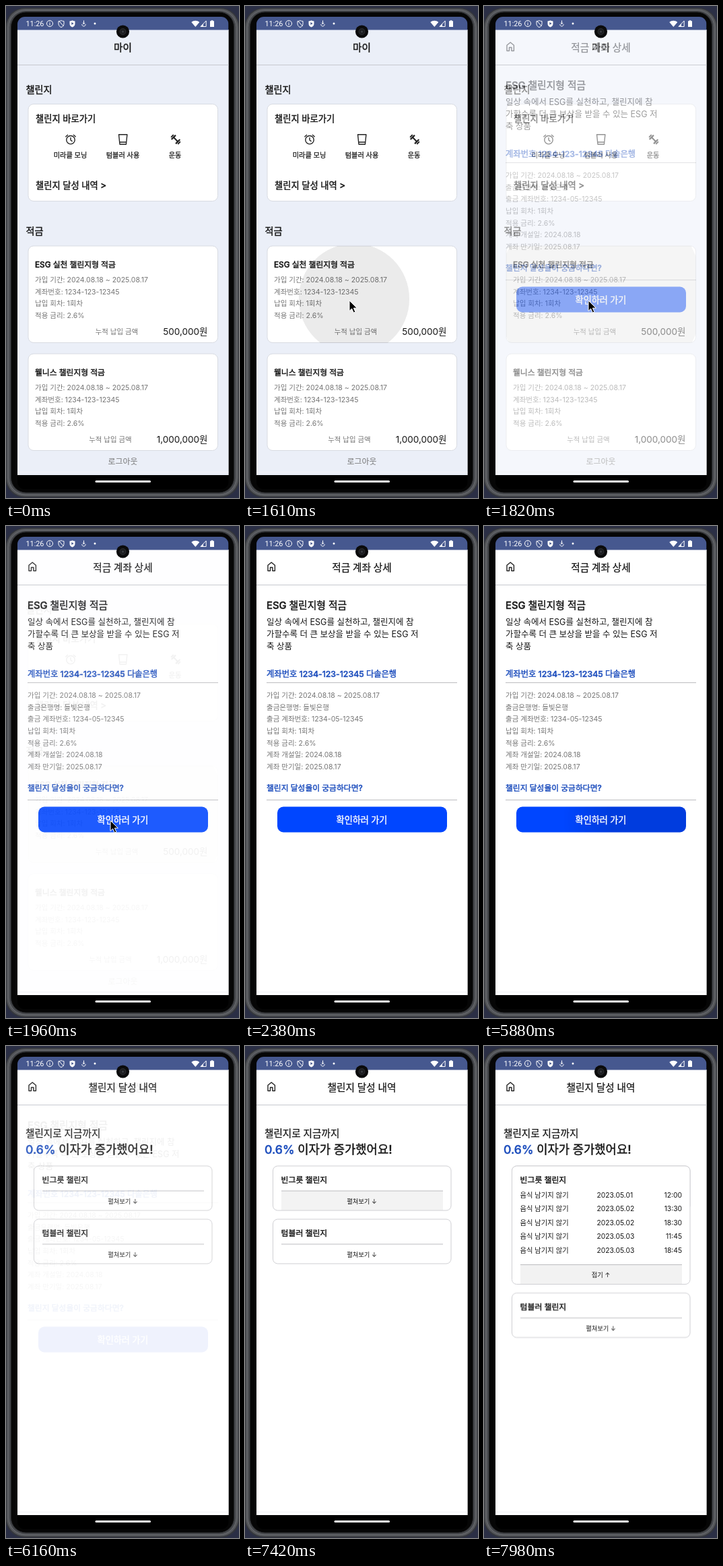
An HTML page for the animation above (8000 ms loop, 346 px wide and 730 px high).

```html
<!DOCTYPE html>
<html lang="ko">
<head>
<meta charset="utf-8">
<title>적금</title>
<style>
html, body { margin: 0; width: 100%; height: 100%; overflow: hidden; background: #2b2f45; }
svg { display: block; width: 346px; height: 730px; }
text { --ink: #161616; font-family: Inter, "Noto Sans CJK KR", "Noto Sans CJK", sans-serif; fill: var(--ink); white-space: pre; }
.mid { text-anchor: middle; }
.end { text-anchor: end; }
/* A thin outline gives the weights between regular and bold. */
.m, .b { font-weight: 500; stroke: var(--ink); stroke-width: .25; }
.b { stroke-width: .42; }
.grey { --ink: #757575; }
.blue { --ink: #1c4dbd; }
tspan { fill: var(--ink); stroke: var(--ink); }
.white { --ink: #fff; fill: #fff; }
.line { fill: none; stroke: #222; stroke-width: 1.4; stroke-linejoin: round; }
.thin { fill: none; stroke: #fff; stroke-width: 1; }
.ripple { transform-box: fill-box; transform-origin: center; }
</style>
</head>
<body>
<svg id="stage" viewBox="0 0 346 730"></svg>
<script>
const LOOP = 8000, MID = 173.5;

const text = (x, y, size, str, cls = '') =>
  `<text x="${x}" y="${y + size * 0.37}" font-size="${size}" class="${cls}">${str}</text>`;
const lines = (x, y, step, size, list, cls) =>
  list.map((str, i) => text(x, y + i * step, size, str, cls)).join('');
const box = (x, y, w, h, r, fill, stroke = 'none') =>
  `<rect x="${x}" y="${y}" width="${w}" height="${h}" rx="${r}" fill="${fill}" stroke="${stroke}"/>`;
const rule = (x, y, w, color = '#bcbcc0') => box(x, y, w, 1, 0, color);
const group = (id, content, attrs = '') => `<g id="${id}" ${attrs}>${content}</g>`;

const page = (bg, title, weight = 'm') =>
  box(17, 35, 313.5, 661, 0, bg) + rule(17, 87, 313.5, '#c6c9cf') + text(MID, 61.5, 14.6, title, 'mid ' + weight);
const home = '<path class="line" d="M34 58.3 39.2 54l5.2 4.3v8.2h-3.5v-5h-3.4v5H34Z"/>';

const savings = (y, name, amount, labelEnd) =>
  box(33, y, 281.5, 143.5, 8, '#fff', '#d8dbe2') +
  text(43, y + 28, 11.8, name, 'b') +
  lines(43, y + 50, 17.7, 10.5, [
    '가입 기간: 2024.08.18 ~ 2025.08.17', '계좌번호: 1234-123-12345', '납입 회차: 1회차', '적용 금리: 2.6%'
  ], 'grey') +
  text(labelEnd, y + 127, 10.4, '누적 납입 금액', 'grey end') +
  text(299.5, y + 127, 13.5, amount, 'end');

const alarm = `<g class="line"><circle cx="96" cy="198.7" r="6.2"/>
  <path d="M96 195v4l2.6 1.8M88.4 194.2l3.6-3.2M103.6 194.2l-3.6-3.2"/></g>`;
const cup = '<path class="line" d="M167.5 190.8h12.4l-1.5 14.4h-9.4ZM168.800 202h9.800"/>';
const dumbbell = `<g transform="translate(252 198) rotate(45) scale(.9)">
  ${box(-5, -1.1, 10, 2.2, 0, '#222')}${[-1, 1].map(s =>
    box(s * 5 - 1.3, -5, 2.6, 10, 0.8, '#222') + box(s * 8 - 1, -3, 2, 6, 0.8, '#222')).join('')}</g>`;

const myPage = page('#ebeff8', '마이', 'b') +
  text(29.5, 123.5, 14.2, '챌린지', 'b') +
  box(33, 145.5, 281.5, 144, 8, '#fff', '#d8dbe2') +
  text(44, 167, 13.3, '챌린지 바로가기', 'b') +
  alarm + cup + dumbbell +
  text(95.5, 221, 10.2, '미라클 모닝', 'mid m') +
  text(173.5, 221, 10.2, '텀블러 사용', 'mid m') +
  text(251, 221, 10.2, '운동', 'mid m') +
  text(44, 266, 13.3, '챌린지 달성 내역 &gt;', 'b') +
  text(29.5, 334, 14.2, '적금', 'b') +
  savings(356, 'ESG 실천 챌린지형 적금', '500,000원', 196) +
  '<g clip-path="url(#cardClip)"><circle id="cardRipple" class="ripple" cx="173" cy="429" r="153" opacity="0"/></g>' +
  savings(516, '웰니스 챌린지형 적금', '1,000,000원', 186.5) +
  text(MID, 676, 11.9, '로그아웃', 'mid grey');

const detailPage = page('#fff', '적금 계좌 상세') + home +
  text(32, 118, 14.8, 'ESG 챌린지형 적금', 'b') +
  lines(32, 142, 18.2, 12.5, [
    '일상 속에서 ESG를 실천하고, 챌린지에 참', '가할수록 더 큰 보상을 받을 수 있는 ESG 저', '축 상품'
  ]) +
  text(32, 219, 12.3, '계좌번호 1234-123-12345 다솔은행', 'b blue') + rule(32, 232, 283) +
  lines(32, 251, 17.7, 10.5, [
    '가입 기간: 2024.08.18 ~ 2025.08.17', '출금은행명: 들빛은행', '출금 계좌번호: 1234-05-12345',
    '납입 회차: 1회차', '적용 금리: 2.6%', '계좌 개설일: 2024.08.18', '계좌 만기일: 2025.08.17'
  ], 'grey') +
  text(32, 389, 11.8, '챌린지 달성율이 궁금하다면?', 'b blue') + rule(32, 406, 283) +
  box(48, 416.5, 252, 38, 9, '#0046ff') +
  '<g clip-path="url(#buttonClip)"><circle id="buttonRipple" class="ripple" cx="174" cy="435" r="190" fill="url(#soft)" opacity="0"/></g>' +
  text(MID, 436, 13.1, '확인하러 가기', 'mid b white');

const folded = (y, name) =>
  box(41.5, y, 264.5, 66, 7, '#fff', '#cfcfd3') + text(53.5, y + 21, 11.9, name, 'b') +
  rule(54, y + 36.5, 240) + text(MID, y + 52.5, 9.3, '펼쳐보기 ↓', 'mid');

const meals = [['01', '12:00'], ['02', '13:30'], ['02', '18:30'], ['03', '11:45'], ['03', '18:45']];
const opened =
  box(41.5, 178, 264.5, 175.5, 7, '#fff', '#cfcfd3') + text(53.5, 199, 11.9, '빈그릇 챌린지', 'b') +
  meals.map(([day, time], i) => {
    const y = 221 + i * 20.5;
    return text(53.5, y, 10.3, '음식 남기지 않기') + text(167.5, y, 10.3, '2023.05.' + day) +
      text(294, y, 10.3, time, 'end');
  }).join('') +
  box(54, 324, 240, 29, 0, '#f2f2f2') + rule(54, 324, 240) + text(MID, 340, 9.3, '접기 ↑', 'mid');

const rewardPage = page('#fff', '챌린지 달성 내역') + home +
  text(29, 129.5, 14.6, '챌린지로 지금까지', 'm') +
  text(29, 153.5, 17.7, '<tspan class="blue">0.6%</tspan> 이자가 증가했어요!', 'b') +
  folded(178, '빈그릇 챌린지') +
  group('press', box(54, 215.5, 240, 28, 0, '#000'), 'opacity="0"') +
  group('second', folded(257, '텀블러 챌린지')) +
  group('opened', opened, 'opacity="0"');

const shield = 'c2 0 3-.5 4-1.2 1 .7 2 1.2 4 1.2v4c0 2.5-2 4.2-4 5-2-.8-4-2.5-4-5Z';
const statusBar = box(17, 16, 313.5, 19.5, 0, '#46588f') +
  `<text x="29.5" y="30" font-size="10.8" class="white" style="font-family:Roboto,sans-serif">11:26</text>
  <circle class="thin" cx="65" cy="26" r="4.5"/><path class="thin" d="M65 25.2v3.4M65 23.2v1"/>
  <path class="thin" d="M78 22.6${shield}M78.5 22l7 8"/>
  <path class="white" d="M94.5 22.4${shield}"/><path fill="#46588f" d="m97.3 24 3.4 2-3.4 2Z"/>
  <path class="thin" d="M115.5 21.5v5M113.7 25l1.8 1.8 1.8-1.8M112.8 27c0 4 5.4 4 5.4 0"/>
  <circle class="white" cx="132" cy="26" r="1.5"/>
  <path class="white" d="M275.3 23.9c3.5-3 8.5-3 12 0l-6 7.2ZM303 22.3h1.7v-1.1h2.6v1.1h1.7v8.7h-6Z"/>
  <path class="thin" d="M297.2 22v8.5h-8.2Z"/><path class="white" d="M293 26.6v4h-4Z"/>`;

const phone = box(0, 0, 346, 730, 0, '#2b2f45') +
  box(-1, 2.5, 348, 727, 29, '#35373c') +
  box(1, 4, 344, 723.5, 27, '#55575b') +
  box(4, 6.5, 338, 718.5, 25, '#44464a', '#6c6e72') +
  box(7.5, 9, 331, 713, 22, '#060606', '#242527');

const chrome = statusBar + rule(17, 691, 313.5, '#f1f2f5') +
  box(17, 696, 313.5, 21, 0, '#000') + box(132.5, 704, 82.5, 3, 1.5, '#fff');
const camera = `<circle cx="173.5" cy="38" r="9.6" fill="#0b0b0c"/>
  <circle cx="173.5" cy="38" r="4.5" fill="#1c1d20" stroke="#2d2e31"/><circle cx="173.5" cy="38" r="1.5" fill="#3b3d43"/>`;
const cursor = (id, x, y) => group(id,
  `<path transform="translate(${x} ${y})" fill="#000" stroke="#fff" d="M0 0v15.5l3.6-3.4 2.7 6 2.6-1.2-2.6-5.7h5Z"/>`,
  'opacity="0"');

document.getElementById('stage').innerHTML = `<defs>
  <clipPath id="screenClip">${box(17, 16, 313.5, 701, 11, '#000')}</clipPath>
  <clipPath id="cardClip">${box(33, 356, 281.5, 143.5, 8, '#000')}</clipPath>
  <clipPath id="buttonClip">${box(48, 416.5, 252, 38, 9, '#000')}</clipPath>
  <radialGradient id="soft"><stop offset=".5"/><stop offset="1" stop-opacity="0"/></radialGradient></defs>` +
  phone +
  group('screen', box(17, 35, 313.5, 661, 0, '#fff') + group('my', myPage) +
    group('detail', detailPage, 'opacity="0"') + group('reward', rewardPage, 'opacity="0"') +
    chrome, 'clip-path="url(#screenClip)"') +
  camera + cursor('tapCursor', 155, 437) + cursor('blinkCursor', 182, 433);

// Each step is [time in ms, value, easing towards the next step].
function play(id, property, steps) {
  const all = [[0, steps[0][1]], ...steps, [LOOP, steps.at(-1)[1]]];
  document.getElementById(id).animate(
    all.map(([time, value, easing = 'linear']) => ({ offset: time / LOOP, [property]: value, easing })),
    { duration: LOOP, iterations: Infinity });
}
const show = (id, from, to = LOOP, level = 1) =>
  play(id, 'opacity', [[from, 0], [from, level], [to, level], ...(to < LOOP ? [[to, 0]] : [])]);

const FADE = 400, EASE_OUT = 'cubic-bezier(.215,.61,.355,1)';
const fadeIn = from => [[from, 0, EASE_OUT], [from + FADE, 1]];
const fadeOut = from => [[from, 1], [from + FADE, 0]];
const toDetail = 1757, toReward = 5960;

play('my', 'opacity', fadeOut(toDetail));
play('detail', 'opacity', [...fadeIn(toDetail), ...fadeOut(toReward)]);
play('reward', 'opacity', fadeIn(toReward));

show('tapCursor', 1540, 2310);
show('cardRipple', 1540, 2200, 0.08);
play('cardRipple', 'transform', [
  [1540, 'translate(-18px, 9px) scale(.25)', 'ease-out'], [1820, 'translate(0px, 0px) scale(1)']
]);

show('blinkCursor', 3920, 3990);

show('buttonRipple', 5880, 6400, 0.13);
play('buttonRipple', 'transform', [
  [5880, 'translate(86px, 0px) scale(.75)', 'ease-out'], [6100, 'translate(0px, 0px) scale(1)']
]);

show('press', 7420, 7490, 0.05);
show('opened', 7490);
play('second', 'transform', [
  [7490, 'translate(0px, 0px)'], [7490, 'translate(0px, 109.5px)']
]);
</script>
</body>
</html>
```
